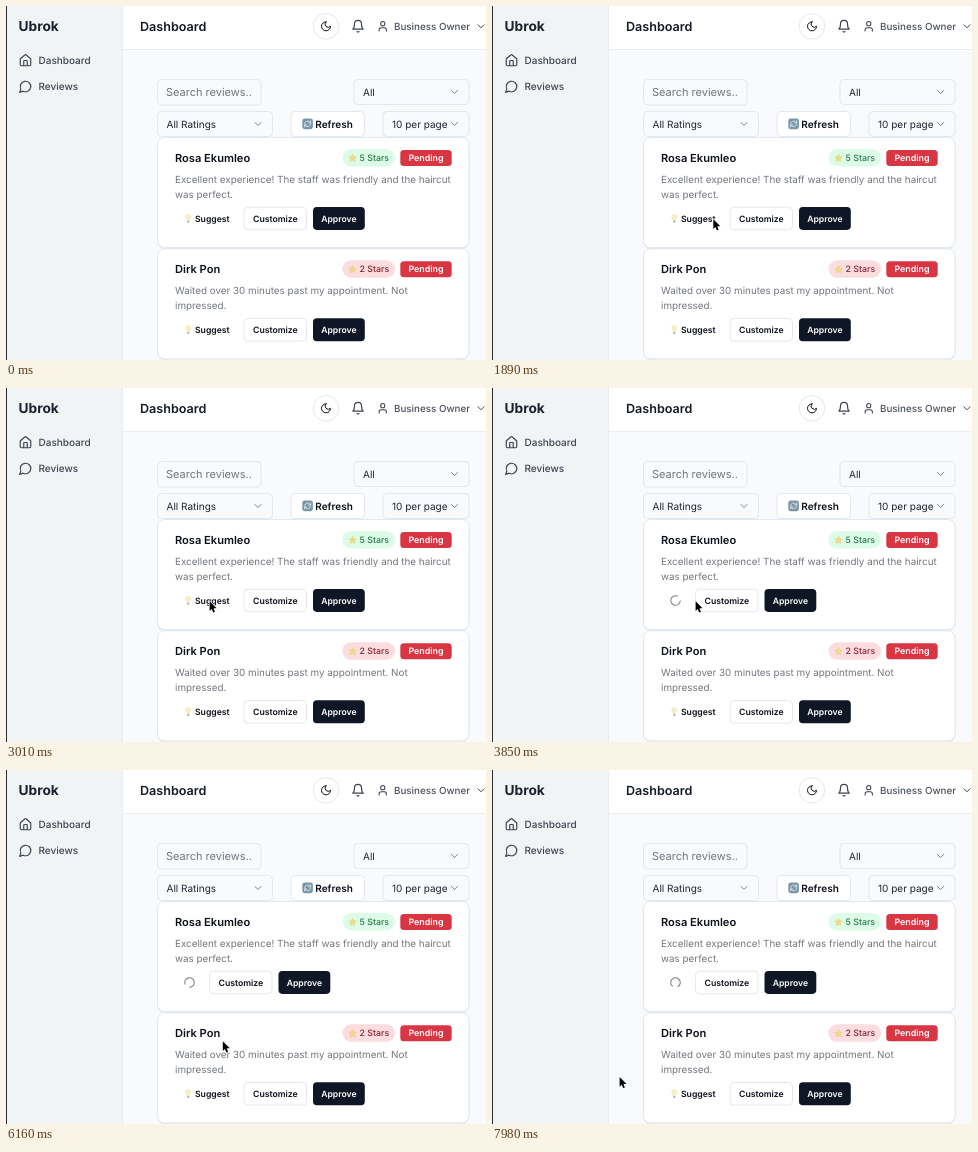
Animation, 480 px wide and 354 px high, one loop 8 s. Source, as an HTML page:

```html
<!DOCTYPE html>
<html lang="en">
<head>
<meta charset="utf-8">
<title>Review dashboard</title>
<style>
  html, body { margin: 0; width: 100%; height: 100%; overflow: hidden; background: #f8fafc; }
  svg { display: block; width: 100vw; height: 100vh; }
  text { font-family: Inter, "Liberation Sans", sans-serif; white-space: pre; text-rendering: geometricPrecision; }
  .icon { fill: none; stroke-width: 2; stroke-linecap: round; stroke-linejoin: round; }
</style>
</head>
<body>
<svg id="stage" viewBox="0 0 480 354" xmlns="http://www.w3.org/2000/svg">
  <defs>
    <filter id="soft" x="-5%" y="-5%" width="110%" height="115%">
      <feDropShadow dx="0" dy="0.7" stdDeviation="0.7" flood-color="#0f172a" flood-opacity="0.12"/>
    </filter>
  </defs>
  <g id="page"></g>
  <circle id="ring" fill="none" stroke="#111" stroke-width="1.5"/>
  <path id="cursor" d="M0 0V9.8L2.1 7.8L3.6 11.2L5.3 10.5L3.9 7.1H7Z" fill="#000" stroke="#fff" stroke-width="1.2" stroke-linejoin="round" paint-order="stroke"/>
</svg>
<script>
const LOOP = 8000, STEP = 70, LOAD_AT = 3850, SPIN = 950, SHIFT = -34.5;
const INK = '#0f1726', BORDER = '#e2e8f0', GREY = '#71767d', SLATE = '#3d4350';
const $ = id => document.getElementById(id);

const rect = (x, y, w, h, r, fill, stroke = 'none', extra = '') =>
  `<rect x="${x}" y="${y}" width="${w}" height="${h}" rx="${r}" fill="${fill}" stroke="${stroke}" ${extra}/>`;
const text = (x, y, size, weight, fill, str) =>
  `<text x="${x}" y="${y}" font-size="${size}" font-weight="${weight}" fill="${fill}">${str}</text>`;
const icon = (x, y, size, color, d) =>
  `<path class="icon" stroke="${color}" transform="translate(${x} ${y}) scale(${size / 24})" d="${d}"/>`;
const chevron = (cx, cy, color = '#7d838c') => icon(cx - 6, cy - 6, 12, color, 'M6 9l6 6 6-6');

const HOME = 'M3 10a2 2 0 0 1 .7-1.5l7-6a2 2 0 0 1 2.6 0l7 6A2 2 0 0 1 21 10v9a2 2 0 0 1-2 2H5a2 2 0 0 1-2-2zM15 21v-8a1 1 0 0 0-1-1h-4a1 1 0 0 0-1 1v8';
const CHAT = 'M7.9 20A9 9 0 1 0 4 16.1L2 22Z';
const MOON = 'M12 3a6 6 0 0 0 9 9 9 9 0 1 1-9-9Z';
const BELL = 'M6 8a6 6 0 0 1 12 0c0 7 3 9 3 9H3s3-2 3-9M10.3 21a1.94 1.94 0 0 0 3.4 0';
const USER = 'M19 21v-2a4 4 0 0 0-4-4H9a4 4 0 0 0-4 4v2M16 7a4 4 0 1 1-8 0a4 4 0 0 1 8 0';
const SYNC = 'M3 11a9 9 0 0 1 15-5l3 3M21 3v6h-6M21 13a9 9 0 0 1-15 5l-3-3M3 21v-6h6';
const ARC = 'M9 0A9 9 0 1 1 2.78 -8.56';

function star(cx, cy, r) {
  const pts = Array.from({ length: 10 }, (_, i) => {
    const a = i * Math.PI / 5 - Math.PI / 2, d = i % 2 ? r * 0.48 : r;
    return `${(cx + d * Math.cos(a)).toFixed(2)},${(cy + d * Math.sin(a)).toFixed(2)}`;
  });
  return `<polygon points="${pts.join(' ')}" fill="#f1dc84" stroke="#dfc878" stroke-width=".4"/>`;
}

const bulb = (cx, cy) =>
  `<path d="M${cx - 1.1} ${cy + 2}C${cx - 1.2} ${cy + .8} ${cx - 2.6} ${cy} ${cx - 2.6} ${cy - 1.6}a2.6 2.6 0 0 1 5.2 0C${cx + 2.6} ${cy} ${cx + 1.2} ${cy + .8} ${cx + 1.1} ${cy + 2}Z" fill="#f8efc4" stroke="#e8dfb0" stroke-width=".4"/>` +
  rect(cx - 1.1, cy + 2.2, 2.2, 2.1, .7, '#b0b2ae');

const select = (x, y, w, label) =>
  rect(x + .5, y + .5, w - 1, 25, 4, '#f8fafc', BORDER) +
  text(x + 9.5, y + 16.6, 10, 400, '#1f2430', label) + chevron(x + w - 15, y + 13);

function card(y, name, lines, stars, pill, ink, id) {
  return `<g transform="translate(0 ${y})">` +
    rect(151.5, .5, 311.5, 110, 7, '#fff', BORDER, 'filter="url(#soft)"') +
    text(169, 25, 11.1, 600, '#0b0f19', name) +
    rect(336.5, 12, 52.5, 17.4, 8.7, pill) + star(346.5, 21.3, 4) +
    text(353.6, 24, 8.8, 500, ink, stars + ' Stars') +
    rect(394.3, 13, 51.4, 16, 3.5, '#d93644') +
    text(402.4, 24.1, 8.9, 600, '#fff', 'Pending') +
    lines.map((s, i) => text(169, 46.2 + i * 14.7, 9.86, 400, GREY, s)).join('') +
    `<g id="suggest${id}">${bulb(182.3, 81.4)}${text(189, 84.6, 8.65, 600, '#0b0f19', 'Suggest')}</g>` +
    `<path id="spin${id}" class="icon" stroke="#7b7f87" d="${ARC}" visibility="hidden"/>` +
    `<g id="actions${id}">` +
      rect(238, 70.2, 62.5, 22.6, 4, '#fff', BORDER) + text(247, 84.6, 8.7, 600, '#0b0f19', 'Customize') +
      rect(307, 70, 51.8, 22.9, 3.8, INK) + text(315.2, 84.6, 8.65, 600, '#fff', 'Approve') +
    '</g></g>';
}

$('page').innerHTML =
  rect(0, 0, 480, 354, 0, '#f8fafc') +
  rect(0, 0, 116.5, 354, 0, '#f1f4f5') +
  rect(116.5, 0, 364, 43, 0, '#fff') +
  rect(116.5, 43, 364, .8, 0, '#e8ecf0') +
  rect(116, 0, .8, 354, 0, '#e6eaed') +
  rect(0, 0, 1, 354, 0, '#2a2c2e') +
  text(12.5, 25, 13.7, 700, '#1b212c', 'Ubrok') +
  icon(12.5, 47.5, 14, SLATE, HOME) + text(32.5, 58, 10, 500, SLATE, 'Dashboard') +
  icon(12.5, 73.5, 14, SLATE, CHAT) + text(32.5, 84, 10, 500, SLATE, 'Reviews') +
  text(134, 25, 12.6, 600, '#141a26', 'Dashboard') +
  `<circle cx="320" cy="20.3" r="12.8" fill="#fff" stroke="${BORDER}"/>` +
  icon(314, 14.3, 12, '#111', MOON) +
  icon(345, 13.2, 14, SLATE, BELL) +
  icon(370.5, 14, 12.5, SLATE, USER) +
  text(388, 23.9, 9.8, 500, '#4a505c', 'Business Owner') +
  chevron(475, 20.3, SLATE) +
  rect(151.5, 73.5, 103.5, 25.5, 4, '#f8fafc', BORDER) +
  text(160, 90.2, 11, 400, GREY, 'Search reviews..') +
  select(347.5, 73, 116, 'All') +
  select(151, 105, 116, 'All Ratings') +
  rect(285, 105.5, 73.5, 25, 4, '#fff', BORDER) +
  rect(296.3, 112.6, 10.6, 10.6, 2.4, '#7896a8') +
  icon(297.6, 113.9, 8, '#fff', SYNC) +
  text(309.3, 121.6, 10, 600, '#0b0f19', 'Refresh') +
  select(376.5, 105, 87, '10 per page') +
  card(131, 'Rosa Ekumleo', ['Excellent experience! The staff was friendly and the haircut', 'was perfect.'], 5, '#dcfce7', '#2c7a4b', 'A') +
  card(242.3, 'Dirk Pon', ['Waited over 30 minutes past my appointment. Not', 'impressed.'], 2, '#fbdcdf', '#8c2433', 'B');

// Pointer path: time, x, y
const PATH = [
  [770, 256, 338], [1190, 280.8, 242], [1400, 280.8, 242], [1820, 226, 213],
  [2030, 208, 214], [2240, 203.6, 231], [2730, 203.6, 231], [3010, 203.6, 213.2],
  [3850, 203.6, 213.2], [4620, 218.8, 254.2], [4690, 218.8, 254.2], [5460, 218, 262],
  [6160, 216.8, 271.2], [6300, 216.5, 274], [7140, 131.5, 308], [7980, 127.6, 306.9]
];

function pointer(t) {
  const i = PATH.findIndex(p => p[0] > t);
  if (i < 0) return PATH[PATH.length - 1].slice(1);
  const [t0, x0, y0] = PATH[i - 1], [t1, x1, y1] = PATH[i];
  const u = (t - t0) / (t1 - t0), e = u * u * (3 - 2 * u);
  return [x0 + (x1 - x0) * e, y0 + (y1 - y0) * e];
}

function show(el, on) { el.setAttribute('visibility', on ? 'visible' : 'hidden'); }

function draw(time) {
  const t = Math.floor((time % LOOP) / STEP) * STEP;

  show($('cursor'), t >= PATH[0][0]);
  if (t >= PATH[0][0]) $('cursor').setAttribute('transform', `translate(${pointer(t)})`);

  // Click ring holds, then widens and fades
  const ring = $('ring'), released = t >= 2520;
  show(ring, t >= 2310 && t < 2590);
  ring.setAttribute('cx', 202.8);
  ring.setAttribute('cy', 230.7);
  ring.setAttribute('r', released ? 20 : 15.3);
  ring.setAttribute('opacity', released ? 0.4 : 1);

  const loading = t >= LOAD_AT;
  show($('suggestA'), !loading);
  show($('spinA'), loading);
  $('actionsA').setAttribute('transform', `translate(${loading ? SHIFT : 0} 0)`);
  const angle = (t - LOAD_AT) / SPIN * 360 + 5;
  $('spinA').setAttribute('transform', `translate(183.5 81.5) rotate(${angle}) scale(.53)`);
}

const start = performance.now();
function tick() {
  draw(performance.now() - start);
  requestAnimationFrame(tick);
}
draw(0);
requestAnimationFrame(tick);
</script>
</body>
</html>
```
